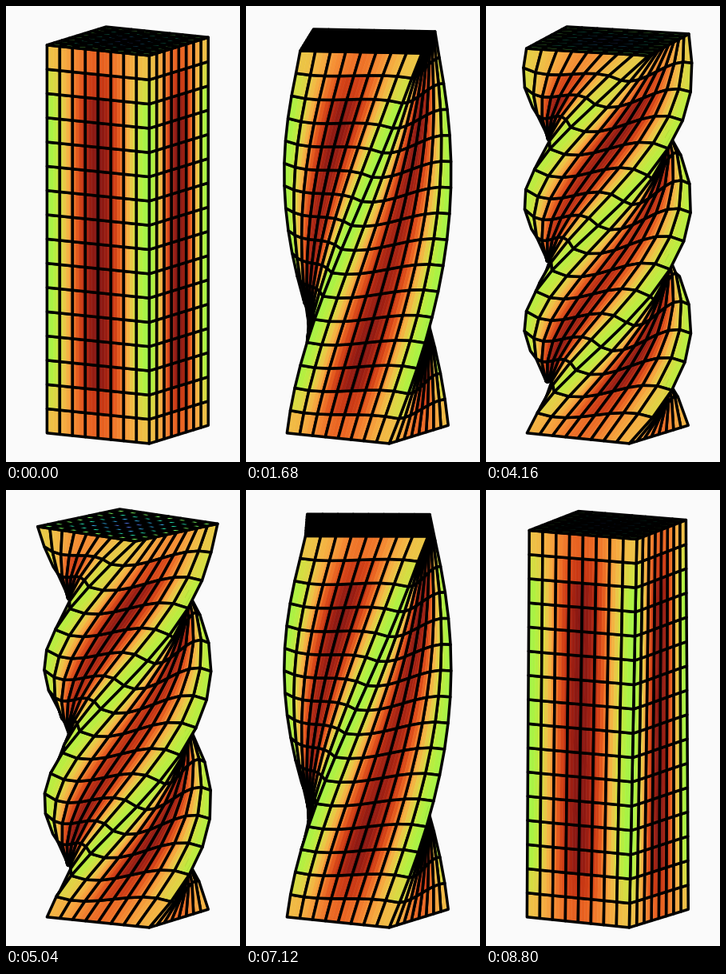
A matplotlib script for the animation above (8.88 s loop, 293 by 570 pixels).

```python
import numpy as np
import matplotlib
import matplotlib.pyplot as plt
from matplotlib.animation import FuncAnimation
from matplotlib.collections import PolyCollection

W, H, DPI = 293, 570, 100
FRAMES, INTERVAL = 111, 80
STEPS, MAX_TWIST = 55, 5.2     # radians at the turning point

CX, CY = 152.3, 529.0          # screen centre of the base
HALF, HEIGHT = 73.9, 485.0     # half side and projected height of the bar
TILT = 0.1777                  # sine of the camera elevation
LENGTH = HEIGHT / np.sqrt(1 - TILT ** 2)
COLS, ROWS, STRIPS = 8, 16, 4
PX = 72 / DPI
LINE = 3.5 * PX

TURBO = matplotlib.colormaps["turbo"]

fig = plt.figure(figsize=(W / DPI, H / DPI), dpi=DPI, facecolor="#fafafa")
ax = fig.add_axes([0, 0, 1, 1])
ax.set_xlim(0, W)
ax.set_ylim(H, 0)
ax.axis("off")

mesh = PolyCollection([], joinstyle="round")
ax.add_collection(mesh, autolim=False)

side = np.linspace(-1, 1, COLS + 1)
level = np.arange(ROWS + 1)


def rotate(x, y, angle):
    c, s = np.cos(angle), np.sin(angle)
    return x * c + y * s, y * c - x * s


def project(x, y, h):
    """Parallel view; the third value grows towards the camera."""
    return np.stack([CX + x, CY - h + TILT * y, y + TILT * h], axis=-1)


def growth(twist):
    """The loaded end widens with the twist."""
    return 0.018 * twist


def wall_nodes(twist):
    face = np.arange(4)[:, None, None]
    z = level[None, :, None]
    u = side[None, None, :]
    angle = np.radians(-30 + 90 * face) + twist * z / ROWS
    size = HALF * (1 + growth(twist) * np.exp(-(ROWS - z) / 0.7))
    x, y = rotate(u * size, size, angle)
    # out-of-plane warping of a square section, held flat at both ends
    free = (1 - np.exp(-0.8 * z)) * (1 - np.exp(-0.8 * (ROWS - z)))
    warp = u * (1 - u ** 2) / 2.5 * HALF ** 2 * twist / LENGTH
    h = HEIGHT * z / ROWS + free * warp
    return project(x, y, h)


def lid_nodes(twist):
    size = HALF * (1 + growth(twist))
    u, v = np.meshgrid(side * size, side * size)
    x, y = rotate(u, v, np.radians(-30) + twist)
    return project(x, y, np.full_like(x, HEIGHT))


def quads(nodes):
    """Corner points of each cell in a (..., rows, cols, 3) node grid."""
    q = np.stack([nodes[..., :-1, :-1, :], nodes[..., :-1, 1:, :],
                  nodes[..., 1:, 1:, :], nodes[..., 1:, :-1, :]], axis=-2)
    return q.reshape(-1, 4, 3)


def shade(value):
    """Colour map, slightly softened."""
    rgba = TURBO(value)
    rgba[..., :3] = 0.9 * rgba[..., :3] + 0.065
    return rgba


strip_mid = (np.arange(COLS * STRIPS) + 0.5) / (COLS * STRIPS) * 2 - 1
BUMP = np.cos(np.pi / 2 * strip_mid) ** 2


def wall_colors(t):
    z = (np.arange(ROWS) + 0.5)[:, None]
    d = np.clip(np.minimum(z, ROWS - z) / 3, 0, 1)
    mix = d * d * (3 - 2 * d)
    low = 0.50 + 0.04 * t ** 2
    peak = 0.99 - 0.10 * t * np.sin(np.pi * z / ROWS) ** 4
    body = low + (peak - low) * BUMP
    end = 0.66 + 0.03 * t * (1 - 2 * z / ROWS) + 0.13 * (1 - 0.4 * t) * BUMP
    rgba = shade(mix * body + (1 - mix) * end)
    rgba = rgba.reshape(ROWS * COLS, STRIPS, 4)
    return np.tile(rgba, (4, 1, 1))


def lid_colors():
    mid = (side[1:] + side[:-1]) / 2
    u, v = np.meshgrid(mid, mid)
    rgba = TURBO(0.08 + 0.42 * np.maximum(abs(u), abs(v)))
    return np.repeat(rgba.reshape(-1, 1, 4), STRIPS, axis=1)


LID = lid_colors()


def facing(q):
    x, y = q[..., 0], q[..., 1]
    x2, y2 = np.roll(x, -1, axis=1), np.roll(y, -1, axis=1)
    return (x * y2 - x2 * y).sum(axis=1) < 0


def strips_of(q):
    """Cut each cell into upright strips, then add the whole cell."""
    parts = []
    a, b, c, d = (q[:, i, :2] for i in range(4))
    for i in range(STRIPS):
        f, g = i / STRIPS, (i + 1) / STRIPS
        parts.append(np.stack([a + (b - a) * f, a + (b - a) * g,
                               d + (c - d) * g, d + (c - d) * f], axis=1))
    parts.append(q[..., :2])
    return np.stack(parts, axis=1).reshape(-1, 4, 2)


def draw(i):
    step = i if i <= STEPS else FRAMES - i
    t = step / STEPS
    twist = MAX_TWIST * t

    walls, colors = quads(wall_nodes(twist)), wall_colors(t)
    seen = facing(walls)
    walls, colors = walls[seen], colors[seen]
    order = np.argsort(walls[..., 2].mean(axis=1))
    cells = np.concatenate([walls[order], quads(lid_nodes(twist))])
    colors = np.concatenate([colors[order], LID])

    n = len(cells)
    clear = np.zeros((n, 1, 4))
    black = clear + [0, 0, 0, 1]
    mesh.set_verts(strips_of(cells))
    mesh.set_facecolor(np.concatenate([colors, clear], axis=1).reshape(-1, 4))
    mesh.set_edgecolor(np.concatenate([colors, black], axis=1).reshape(-1, 4))
    mesh.set_linewidth(np.tile([0.5 * PX] * STRIPS + [LINE], n))
    return mesh,


anim = FuncAnimation(fig, draw, frames=FRAMES, interval=INTERVAL,
                     init_func=lambda: draw(0), repeat=True, repeat_delay=0)
plt.show()
```
